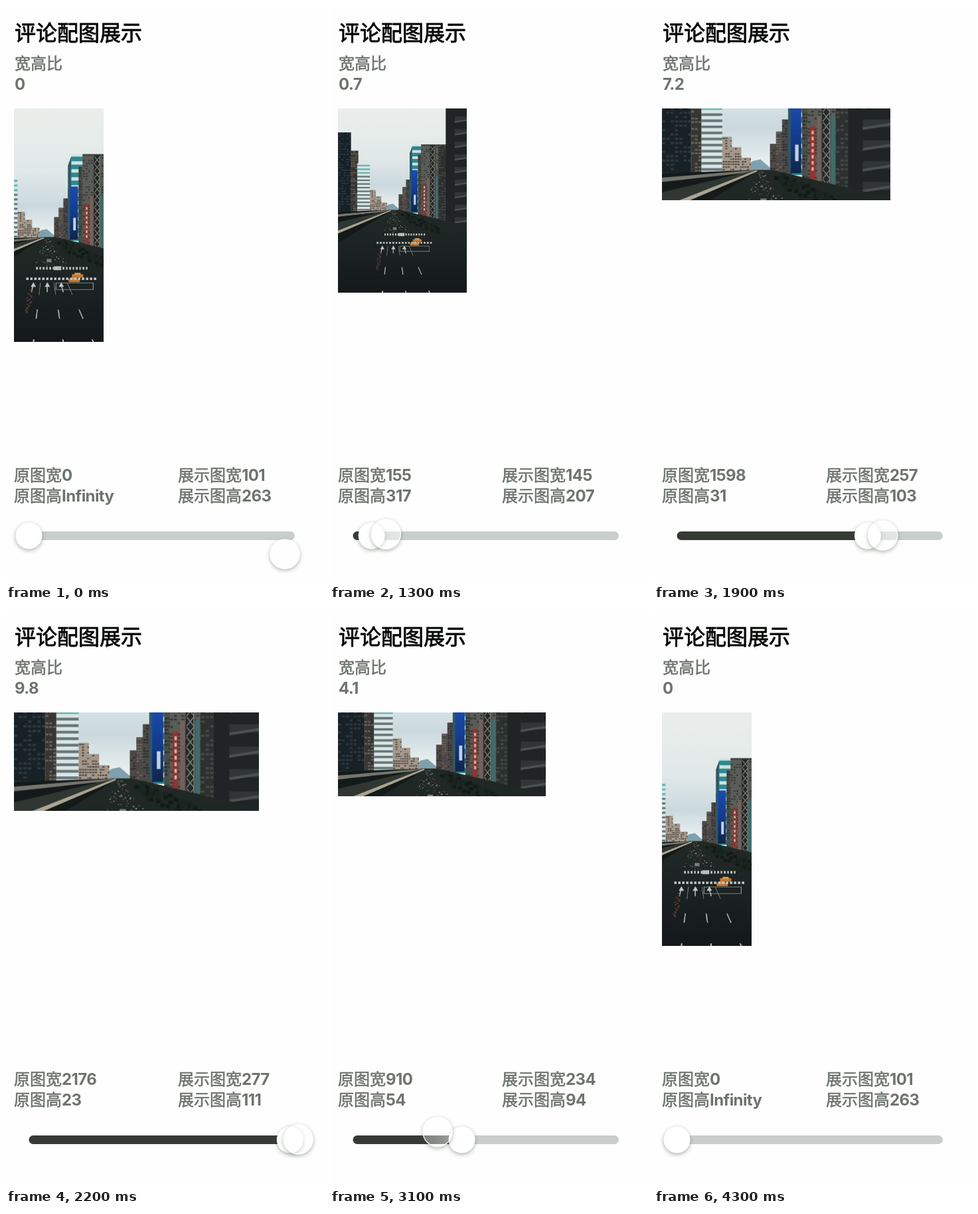
Recreate the animation shown at these times as an HTML page with a canvas. Size 479 by 866 pixels, loop 4400 ms.

```html
<!DOCTYPE html>
<html lang="zh">
<head>
<meta charset="utf-8">
<style>
  html, body { margin: 0; height: 100%; overflow: hidden; background: #fefefe; }
  canvas { display: block; }
</style>
</head>
<body>
<canvas id="stage" width="479" height="866"></canvas>
<script>
const W = 479, H = 866, LOOP = 4400, STEP = 100;
const UNIT = 1.334, LAG = 60, RELEASE = 3600;
const LEFT = 34.5, RIGHT = 435, TRACK_Y = 796.5;
const GREY = '#6d746d', INK = '#050805';
const ctx = document.getElementById('stage').getContext('2d');

// pointer turning points: time, x, y
const KEYS = [
  [0, 420, 824], [200, 308, 772], [300, 308, 772], [900, 38, 793], [1100, 37, 793], [1440, 140, 795],
  [1840, 322, 796], [2240, 445, 796], [2440, 455, 796], [2740, 364, 792], [3340, 53, 781], [3540, 20, 780]
];

// monotone cubic through one column of KEYS
function along(t, column) {
  const last = KEYS.length - 1;
  if (t >= KEYS[last][0]) return KEYS[last][column];
  const i = Math.max(0, KEYS.findIndex(k => k[0] > t) - 1);
  const secant = n => n < 0 || n >= last ? 0
    : (KEYS[n + 1][column] - KEYS[n][column]) / (KEYS[n + 1][0] - KEYS[n][0]);
  const tangent = n => {
    const a = secant(n - 1), b = secant(n);
    return a * b > 0 ? 2 * a * b / (a + b) : 0;
  };
  const span = KEYS[i + 1][0] - KEYS[i][0], u = (t - KEYS[i][0]) / span;
  const ease = u * u * (3 - 2 * u);
  return KEYS[i][column] * (1 - ease) + KEYS[i + 1][column] * ease
    + span * u * (1 - u) * (tangent(i) * (1 - u) - tangent(i + 1) * u);
}

function thumbAt(t) {
  return t < 1200 ? LEFT : Math.min(RIGHT, Math.max(LEFT, along(t - LAG, 1)));
}

// displayed size for an aspect ratio
function displaySize(v) {
  if (v < 1) {
    const h = 263 - 80 * v;
    return { w: h * Math.max(v, 0.384), h };
  }
  const w = v < 2.5 ? 183 + 26 * (v - 1) : 204 + 7.4 * v;
  return { w, h: w / Math.min(v, 2.5) };
}

// street scene, painted once; coordinates start at the photo's centre
function paintStreet() {
  const canvas = Object.assign(document.createElement('canvas'), { width: 395, height: 527 });
  const g = canvas.getContext('2d');
  const halfW = 131.5, halfH = 175.5, vanish = { x: -19, y: 15 };
  let seed = 7;
  const random = () => (seed = seed * 16807 % 2147483647) / 2147483647;
  const rect = (x, y, w, h, color) => { g.fillStyle = color; g.fillRect(x, y, w, h); };
  const poly = (color, ...points) => {
    g.fillStyle = color;
    g.beginPath();
    points.forEach(p => g.lineTo(...p));
    g.fill();
  };
  const gradient = (y1, y2, ...colors) => {
    const fill = g.createLinearGradient(0, y1, 0, y2);
    colors.forEach((c, i) => fill.addColorStop(i / (colors.length - 1), c));
    return fill;
  };
  const building = (x, top, w, base, wall, pane, cell = 4) => {
    rect(x, top, w, base - top, wall);
    for (let y = top + 1; y < base; y += cell)
      for (let wx = x + 0.5; wx < x + w - 1; wx += cell)
        if (random() < 0.6) rect(wx, y, Math.min(cell * 0.75, x + w - wx), cell * 0.5, pane);
  };
  // x on a ground line that reaches the bottom edge at xb
  const laneX = (xb, y) => vanish.x + (xb - vanish.x) * (y - vanish.y) / (halfH - vanish.y);
  const lane = (xb, y1, y2, color, w = 1.5) =>
    poly(color, [laneX(xb, y1), y1], [laneX(xb, y1) + w, y1], [laneX(xb, y2) + w, y2], [laneX(xb, y2), y2]);

  g.scale(1.5, 1.5);
  g.translate(halfW, halfH);
  rect(-halfW, -halfH, 263, 351, gradient(-halfH, 20, '#e9eeeb', '#e6ecea', '#e0e8e8', '#cbd9de', '#f0f5f4'));
  poly('#7fa0ae', [-38, 18], [-27, 8], [-18, 6], [-4, 18]);

  // left side
  building(-132, -130, 34, 30, '#182126', '#2b383e', 5);
  building(-98, -95, 14, 28, '#383633', '#6a645b');
  rect(-86, -71, 24, 95, '#dbe5e3');
  for (let y = -68; y < 22; y += 7) rect(-86, y, 24, 3, y < -50 ? '#64b5b2' : '#64777b');
  for (let i = 0; i < 3; i++) building(-62 + i * 11, -20 + i * 12, 11, 20, '#a3978a', '#4d4741', 3);

  // right side
  for (let i = 0; i < 4; i++) building(-7 + i * 7, -12 - i * 14, 8, 40, '#4d4846', i % 2 ? '#73695f' : '#292c2d', 3);
  poly('#2f5868', [14, -90], [20, -106], [20, 20], [14, 20]);
  rect(19, -106, 27, 130, '#cfe0df');
  for (let y = -103; y < 20; y += 12) rect(19, y, 27, 7, '#2b8990');
  building(30, -88, 10, 55, '#4a4d4a', '#2c312f');
  building(36, -107, 48, 58, '#5a5c57', '#353a37');
  rect(17, -58, 12, 80, gradient(-58, 22, '#1c4cae', '#143a8c', '#0f2648'));
  rect(22, -11, 4, 19, '#c3d3df');
  rect(39, -32, 6, 80, '#8f352f');
  for (let y = -27; y < 22; y += 7) rect(41, y, 2.5, 4, '#d3b5aa');
  rect(47, -44, 5, 90, '#75605b');
  rect(53, -105, 10, 158, '#252826');
  g.strokeStyle = '#858780';
  for (let y = -103; y < 48; y += 11) {
    g.beginPath();
    for (const [x, dy] of [[54, 0], [62, 10], [62, 0], [54, 10]]) g.lineTo(x, y + dy);
    g.stroke();
  }
  rect(63, -44, 5, 90, '#3f6b6b');
  building(69, -105, 14, 58, '#2c302f', '#444845', 5);
  rect(83, -halfH, 49, 260, '#202425');
  for (let y = -160; y < 50; y += 24) {
    rect(100, y, 32, 9, '#303536');
    poly('#4b5051', [100, y + 9], [132, y + 4], [132, y + 7], [100, y + 12]);
  }

  // ground, trees and elevated rail
  poly(gradient(18, halfH, '#222a27', '#1e2524', '#191f20', '#14191a'),
    [-132, 30], [-24, 18], [-5, 18], [132, 50], [132, 176], [-132, 176]);
  for (let i = 0; i < 90; i++) {
    const x = -2 + random() * 70;
    rect(x, 18 + x * 0.45 + random() * 16, 5, 4, random() < 0.5 ? '#121a16' : '#1b2520');
  }
  const beam = (y, thick, color) => poly(color, [-132, y], [-22, 18], [-22, 20], [-132, y + thick]);
  beam(22, 65, '#141a19');
  beam(27, 5, '#74766e');
  beam(44, 18, '#303631');
  beam(61, 6, '#aaa593');

  // traffic
  for (let i = 0; i < 70; i++) {
    const y = 20 + random() * 42;
    rect(laneX(-90 + random() * 190, y), y, 1.6, 1, ['#8d9491', '#46585b', '#7c463e'][i % 3]);
  }
  rect(-18, 51, 7, 5, '#758184');
  rect(-7, 62, 11, 6, '#b2b9b6');
  for (const [x, y] of [[20, 72], [15, 79]]) {
    rect(x, y + 2, 17, 5, '#bf7735');
    rect(x + 4, y, 9, 3, '#dd9b55');
  }

  // road paint
  const paint = '#bfc5c1';
  for (let x = -34; x < 42; x += 5) rect(x, 63, 2.5, 4, paint);
  for (let x = -49; x < 54; x += 6) rect(x, 79, 3.5, 3.5, paint);
  g.strokeStyle = '#8d9490';
  g.strokeRect(-4, 87, 56, 10);
  for (const xb of [-39, 6, 51]) {
    lane(xb, 87, 105, '#7d8480', 1);
    lane(xb, 127, 141, paint);
    lane(xb, 172, 176, paint, 2);
    const x = laneX(xb - 23, 90);
    lane(xb - 23, 90, 101, paint);
    poly(paint, [x + 1, 86], [x + 5, 93], [x - 3, 93]);
  }
  for (let i = 0; i < 20; i++) rect(-46 - i * 0.5 + random() * 8, 97 + i * 1.8, 3, 1.2, '#704238');
  return canvas;
}

const street = paintStreet();

function drawPhoto({ w, h }) {
  w = Math.ceil(w * UNIT);
  h = Math.ceil(h * UNIT);
  const scale = Math.max(w / street.width, h / street.height);
  const cropW = w / scale, cropH = h / scale;
  ctx.drawImage(street, (street.width - cropW) / 2, (street.height - cropH) / 2, cropW, cropH, 12, 154, w, h);
}

function chinese(text, x, y, size, color) {
  ctx.font = `400 ${size}px "Noto Sans CJK SC", "Noto Sans CJK", sans-serif`;
  ctx.letterSpacing = '0px';
  ctx.fillStyle = ctx.strokeStyle = color;
  ctx.lineWidth = size / 40;
  ctx.fillText(text, x, y);
  ctx.strokeText(text, x, y);
}

function latin(text, x, y) {
  ctx.font = '700 24px Inter, sans-serif';
  ctx.letterSpacing = '-0.6px';
  ctx.fillStyle = GREY;
  ctx.fillText(text, x, y);
}

function field(label, value, x, y) {
  chinese(label, x, y, 24, GREY);
  latin(Math.round(value), x + label.length * 24, y);
}

function bar(to, color) {
  ctx.fillStyle = color;
  ctx.beginPath();
  ctx.roundRect(LEFT, TRACK_Y - 6.5, to - LEFT, 13, 6.5);
  ctx.fill();
}

function disc(x, y, r, fill) {
  ctx.fillStyle = fill;
  ctx.beginPath();
  ctx.arc(x, y, r, 0, 7);
  ctx.fill();
}

function shadowDisc(x, y, r) {
  ctx.shadowColor = 'rgba(60,85,60,.45)';
  ctx.shadowBlur = 6;
  ctx.shadowOffsetY = 2;
  disc(x, y, r, '#fff');
}

function drawSlider(x) {
  bar(RIGHT, '#c9cecb');
  if (x > LEFT) bar(x, '#353a35');
  ctx.save();
  shadowDisc(x, TRACK_Y, 20);
  ctx.restore();
}

function drawPointer(x, y) {
  ctx.save();
  // the shadow stays outside the translucent disc
  ctx.beginPath();
  ctx.rect(0, 0, W, H);
  ctx.arc(x, y, 22.5, 0, 7);
  ctx.clip('evenodd');
  shadowDisc(x, y, 22.5);
  ctx.restore();
  const glass = ctx.createLinearGradient(x - 22, 0, x + 22, 0);
  glass.addColorStop(0, 'rgba(255,255,255,.35)');
  glass.addColorStop(1, 'rgba(255,255,255,.5)');
  disc(x, y, 22, glass);
  ctx.strokeStyle = 'rgba(255,255,255,.85)';
  ctx.lineWidth = 1.5;
  ctx.stroke();
}

function draw(t) {
  const x = thumbAt(t);
  const ratio = Math.round((x - LEFT) / (RIGHT - LEFT) * 100) / 10;
  const size = displaySize(ratio);
  ctx.fillStyle = '#fefefe';
  ctx.fillRect(0, 0, W, H);
  chinese('评论配图展示', 13, 52, 32, INK);
  chinese('宽高比', 13, 95, 24, GREY);
  latin(ratio, 13, 126);
  drawPhoto(size);
  field('原图宽', 222 * ratio, 12, 714);
  field('原图高', 222 / ratio, 12, 745);
  field('展示图宽', size.w, 259, 714);
  field('展示图高', size.h, 259, 745);
  drawSlider(x);
  if (t < RELEASE) drawPointer(along(t, 1), along(t, 2));
}

function tick() {
  const t = performance.now() % LOOP;
  draw(Math.floor(t / STEP) * STEP);
  requestAnimationFrame(tick);
}
tick();
</script>
</body>
</html>
```
